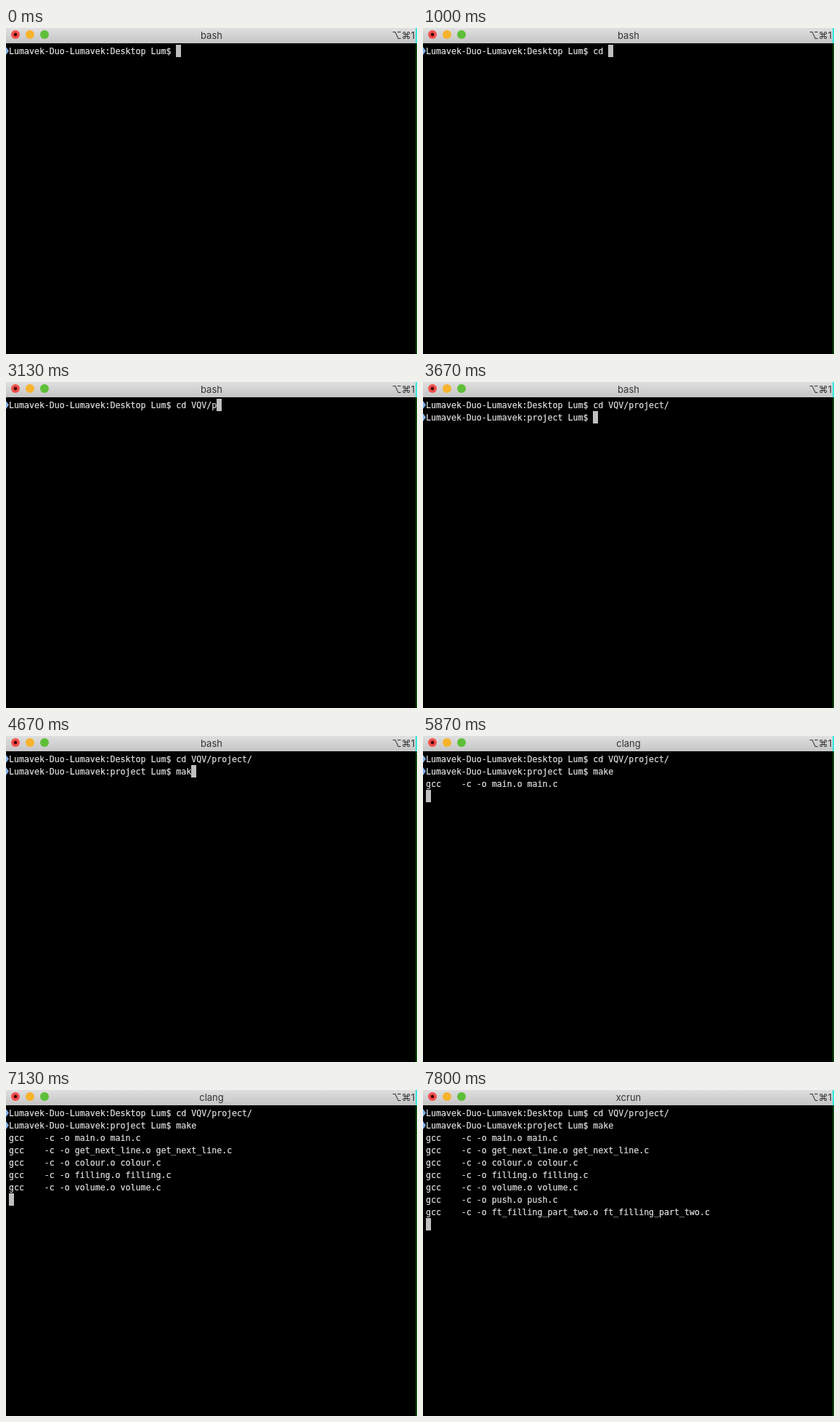
An HTML page for the animation above (8 s loop, 566 by 448 pixels).

```html
<!DOCTYPE html>
<html lang="en">
<head>
<meta charset="utf-8">
<style>
  html, body { margin: 0; width: 100%; height: 100%; overflow: hidden; background: #000; }
  #stage { position: relative; width: 566px; height: 448px; overflow: hidden; background: #000; }
  #bar {
    position: absolute; inset: 0 0 auto; height: 21px;
    background: linear-gradient(#e0dfe0, #c6c5c6);
    font: 13px/21px Inter, "DejaVu Sans", sans-serif; color: #333; text-align: center;
  }
  #bar i { position: absolute; top: 3px; width: 12px; height: 12px; border-radius: 50%; }
  #bar .close { left: 7px; background: radial-gradient(circle, #4c0505 2px, #f4504c 2.8px); }
  #bar .mini { left: 27px; background: #f6b32c; }
  #bar .zoom { left: 47px; background: #5ebf38; }
  #keys { position: absolute; right: 3px; top: 0; white-space: nowrap; }
  #edge {
    position: absolute; right: 0; top: 0; width: 2px; height: 448px;
    background: linear-gradient(#35e6e0 21px, #064006 21px);
  }
  #screen {
    position: absolute; left: 4px; top: 24px; margin: 0;
    font: 11.6px/17px "DejaVu Sans Mono", monospace; color: #e2e2e2;
    -webkit-text-stroke: .2px;
  }
  #screen div { position: relative; height: 17px; white-space: pre; }
  #screen .prompt::before {
    content: ""; position: absolute; left: -4px; top: 2px; width: 4px; height: 11px;
    background: #82b2ea; clip-path: polygon(0 0, 100% 50%, 0 100%);
  }
  #cursor {
    display: inline-block; position: relative; top: -1px; width: 7px; height: 17px;
    vertical-align: top; background: #bfbfbf;
  }
</style>
</head>
<body>
<div id="stage">
  <div id="bar">
    <i class="close"></i><i class="mini"></i><i class="zoom"></i>
    <span id="title"></span><span id="keys">⌥⌘1</span>
  </div>
  <pre id="screen"></pre>
  <div id="edge"></div>
</div>
<script>
const LOOP = 8000;
const host = "Lumavek-Duo-Lumavek";
const prompt = dir => `${host}:${dir} Lum$ `;
const compile = name => `gcc    -c -o ${name}.o ${name}.c\n`;

// [time in ms, text added to the screen]
const output = [
  [0, prompt("Desktop")],
  [70, "c"], [130, "d"], [470, " "], [1330, "V"], [1530, "Q"], [1800, "V/"],
  [3130, "p"], [3270, "roject/"],
  [3670, "\n" + prompt("project")],
  [4400, "m"], [4530, "a"], [4670, "k"], [4870, "e"], [5000, "\n"],
  [5070, compile("main")],
  [5930, compile("get_next_line")],
  [6470, compile("colour")],
  [6800, compile("filling")],
  [7130, compile("volume")],
  [7470, compile("push")],
  [7800, compile("ft_filling_part_two")]
];
const titles = [[0, "bash"], [5870, "clang"], [7270, "xcrun"]];

const screenEl = document.getElementById("screen");
const titleEl = document.getElementById("title");
const reached = (list, t) => list.filter(([at]) => at <= t).map(([, text]) => text);
let shown;

function draw(t) {
  const text = reached(output, t).join("");
  titleEl.textContent = reached(titles, t).pop();
  if (text === shown) return;
  shown = text;
  screenEl.innerHTML = text.split("\n").map((line, i, lines) =>
    `<div class="${line.startsWith(host) ? "prompt" : ""}">${line}` +
    (i === lines.length - 1 ? '<span id="cursor"></span>' : "") + "</div>").join("");
}

function tick() {
  draw(performance.now() % LOOP);
  requestAnimationFrame(tick);
}
tick();
</script>
</body>
</html>
```
